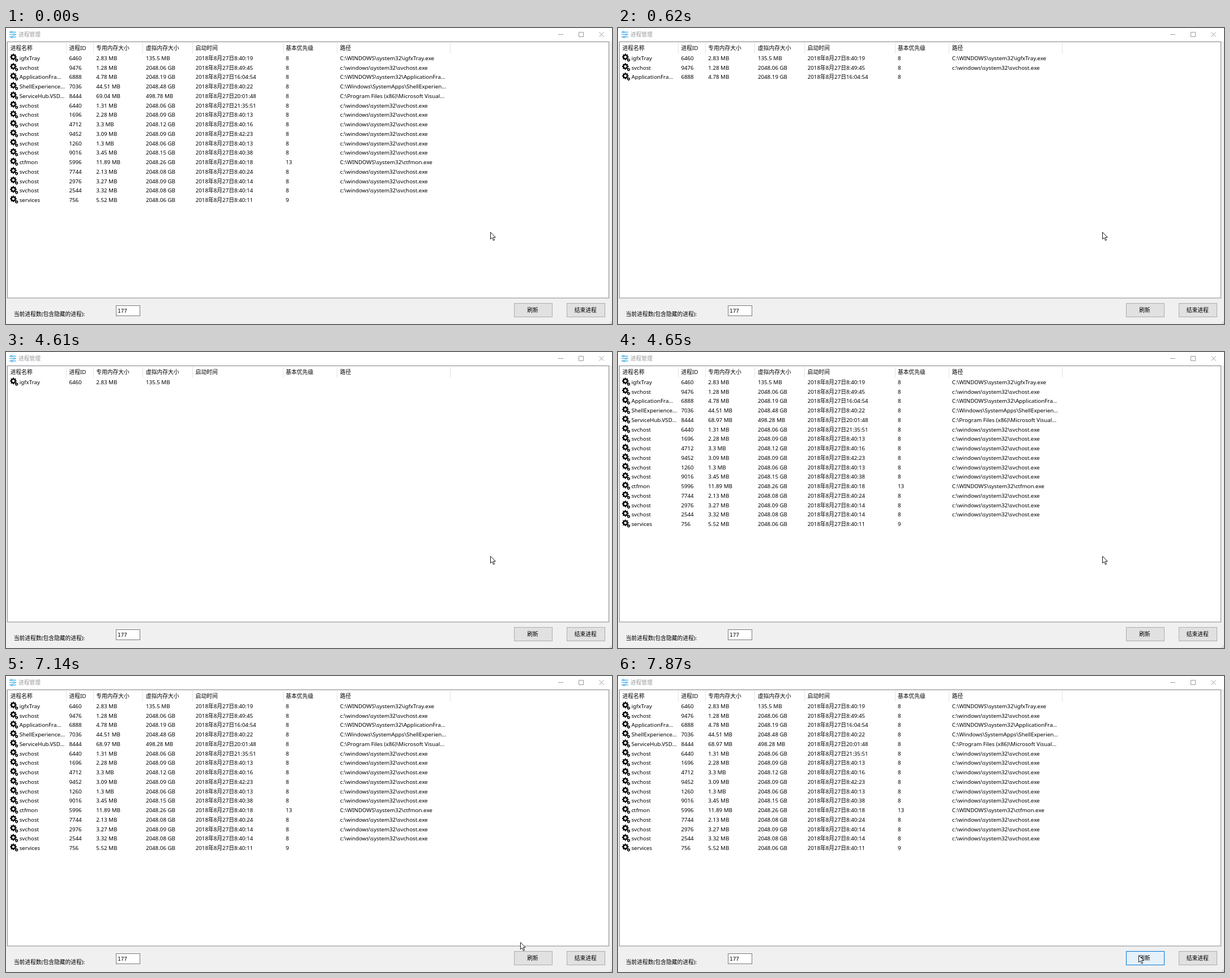
These frames come from a looping animation (1070x524 px, 8000 ms). An HTML page:

```html
<!DOCTYPE html>
<html lang="zh-CN">
<head>
<meta charset="utf-8">
<title>进程管理</title>
<style>
  html, body { margin: 0; width: 100%; height: 100%; overflow: hidden; background: #f0f0f0; }
  svg { display: block; width: 1070px; height: 524px; }
  text { font: 9.75px "Noto Sans", "Noto Sans CJK SC", "Noto Sans CJK", sans-serif; white-space: pre; }
  .mono { font: 9.4px "DejaVu Sans Mono", monospace; }
  .line { fill: none; stroke: #999; }
  .button rect { fill: #e1e1e1; stroke: #adadad; }
  .button text { text-anchor: middle; }
  .button.hover rect { fill: #e5f1fb; stroke: #0078d7; }
</style>
</head>
<body>
<svg viewBox="0 0 1070 524">
  <defs>
    <g id="gears" fill-rule="evenodd"></g>
  </defs>

  <rect width="1070" height="23.5" fill="#fff"/>
  <g fill="#fff" stroke="#3aabe6" stroke-width="1.2">
    <path d="M6 7.3H18M6 11.5H18M6 15.8H18"/>
    <circle cx="9.7" cy="7.3" r="1.5"/>
    <circle cx="14.5" cy="11.5" r="1.5"/>
    <circle cx="10.7" cy="15.8" r="1.5"/>
  </g>
  <text x="22" y="15.3" fill="#999">进程管理</text>
  <path class="line" d="M975 11.5H984M1011.5 7.5H1019.5V15.5H1011.5ZM1047.5 7.5L1055.5 15.5M1055.5 7.5L1047.5 15.5"/>

  <rect x="2.5" y="24.5" width="1062" height="453.5" fill="#fff" stroke="#828790"/>
  <g id="header"></g>
  <g id="list"></g>

  <text x="13.8" y="510">当前进程数(包含隐藏的进程):</text>
  <rect x="194.5" y="491.5" width="42" height="18" fill="#fff" stroke="#7a7a7a"/>
  <text class="mono" x="197" y="503.5">177</text>
  <g class="button" id="refresh">
    <rect x="897.5" y="487.5" width="67" height="24"/>
    <text x="930" y="503.2">刷新</text>
  </g>
  <g class="button">
    <rect x="990.5" y="487.5" width="67" height="24"/>
    <text x="1023.3" y="503.2">结束进程</text>
  </g>
  <path d="M1065 523.5h1.6M1068 523.5h1.6M1068 520.5h1.6" stroke="#b8b8b8" stroke-width="1.6"/>

  <path id="cursor" d="M.5 .5V12.8L3.4 10.2L5.6 15.2L7.6 14.3L5.5 9.5H9.2Z"
        fill="#fff" stroke="#000" stroke-width=".9"/>
</svg>
<script>
const LOOP = 8000;
const COLUMNS = [23.7, 111.4, 159.2, 246.9, 334.7, 494, 589.8];
const TITLES = ['进程名称', '进程ID', '专用内存大小', '虚拟内存大小', '启动时间', '基本优先级', '路径'];
const DIVIDERS = [106.5, 154.5, 241.5, 329.5, 489.5, 584.5, 784.5];
const SVCHOST = 'c:\\windows\\system32\\svchost.exe';

// name | id | private MB | virtual size | start | priority | path
const ROWS = String.raw`
igfxTray|6460|2.83|135.5 MB|8:40:19|8|C:\WINDOWS\system32\igfxTray.exe
svchost|9476|1.28|2048.06 GB|8:49:45|8
ApplicationFra...|6888|4.78|2048.19 GB|16:04:54|8|C:\WINDOWS\system32\ApplicationFra...
ShellExperience...|7036|44.51|2048.48 GB|8:40:22|8|C:\Windows\SystemApps\ShellExperien...
ServiceHub.VSD...|8444|69.04|498.78 MB|20:01:48|8|C:\Program Files (x86)\Microsoft Visual...
svchost|6440|1.31|2048.06 GB|21:35:51|8
svchost|1696|2.28|2048.09 GB|8:40:13|8
svchost|4712|3.3|2048.12 GB|8:40:16|8
svchost|9452|3.09|2048.09 GB|8:42:23|8
svchost|1260|1.3|2048.06 GB|8:40:13|8
svchost|9016|3.45|2048.15 GB|8:40:38|8
ctfmon|5996|11.89|2048.26 GB|8:40:18|13|C:\WINDOWS\system32\ctfmon.exe
svchost|7744|2.13|2048.08 GB|8:40:24|8
svchost|2976|3.27|2048.09 GB|8:40:14|8
svchost|2544|3.32|2048.08 GB|8:40:14|8
services|756|5.52|2048.06 GB|8:40:11|9`.trim().split('\n').map(line => {
  const [name, id, memory, virtual, start, priority, path] = line.split('|');
  return [name, id, memory + ' MB', virtual, '2018年8月27日' + start, priority,
    path || (name === 'svchost' ? SVCHOST : '')];
});

const byId = id => document.getElementById(id);

function add(parent, tag, attrs, content = '') {
  const node = document.createElementNS('http://www.w3.org/2000/svg', tag);
  for (const key in attrs) node.setAttribute(key, attrs[key]);
  node.textContent = content;
  return parent.appendChild(node);
}

function gearPath(cx, cy, radius, hole, teeth) {
  const points = [];
  for (let i = 0; i < teeth * 4; i++) {
    const angle = (i - 1.5) / (teeth * 4) * 2 * Math.PI;
    const r = i % 4 === 1 || i % 4 === 2 ? radius : radius * 0.76;
    points.push(`${(cx + r * Math.sin(angle)).toFixed(2)} ${(cy - r * Math.cos(angle)).toFixed(2)}`);
  }
  return `M${points.join('L')}Z M${cx - hole} ${cy}a${hole} ${hole} 0 1 0 ${2 * hole} 0a${hole} ${hole} 0 1 0 ${-2 * hole} 0Z`;
}

add(byId('gears'), 'path', { d: gearPath(13, 51.3, 6, 2.2, 8) });
add(byId('gears'), 'path', { d: gearPath(18.7, 56.8, 3, 1, 6) });

TITLES.forEach((title, i) => {
  add(byId('header'), 'text', { x: i ? COLUMNS[i] : 7.7, y: 38.7 }, title);
  add(byId('header'), 'path', { d: `M${DIVIDERS[i]} 26V45`, stroke: '#e3e3e3' });
});

const cells = [];
ROWS.forEach((row, r) => {
  const dy = r * 16.74;
  row.forEach((value, c) => {
    const cell = add(byId('list'), 'g', {});
    if (c === 0) add(cell, 'use', { href: '#gears', y: dy });
    add(cell, 'text', { x: COLUMNS[c], y: 56.9 + dy }, value);
    cells.push(cell);
  });
});
const hubMemory = cells[4 * 7 + 2].querySelector('text');
const hubVirtual = cells[4 * 7 + 3].querySelector('text');

function filledCells(t) {
  if (t >= 620 && t < 700) return 20;
  if (t >= 4610 && t < 4650) return 4;
  return cells.length;
}

function cursorAt(t) {
  if (t < 6640) return [855, 361];
  if (t >= 7870) return [919, 494];
  if (t >= 7825) return [919, 493];
  if (t >= 7780) return [918.5, 493];
  const p = Math.min(19, Math.floor((t - 6640) / 34.2)) / 19;
  const ease = p * p * (3 - 2 * p);
  return [859 + 59 * ease, 365 + 128 * ease];
}

function draw(t) {
  const count = filledCells(t);
  cells.forEach((cell, i) => { cell.style.display = i < count ? '' : 'none'; });
  hubMemory.textContent = t < 620 ? '69.04 MB' : '68.97 MB';
  hubVirtual.textContent = t < 620 ? '498.78 MB' : '498.28 MB';
  const [x, y] = cursorAt(t);
  byId('cursor').setAttribute('transform', `translate(${x} ${y})`);
  byId('refresh').classList.toggle('hover', y >= 487);
}

const began = performance.now();
function tick() {
  draw((performance.now() - began) % LOOP);
  requestAnimationFrame(tick);
}
tick();
</script>
</body>
</html>
```
